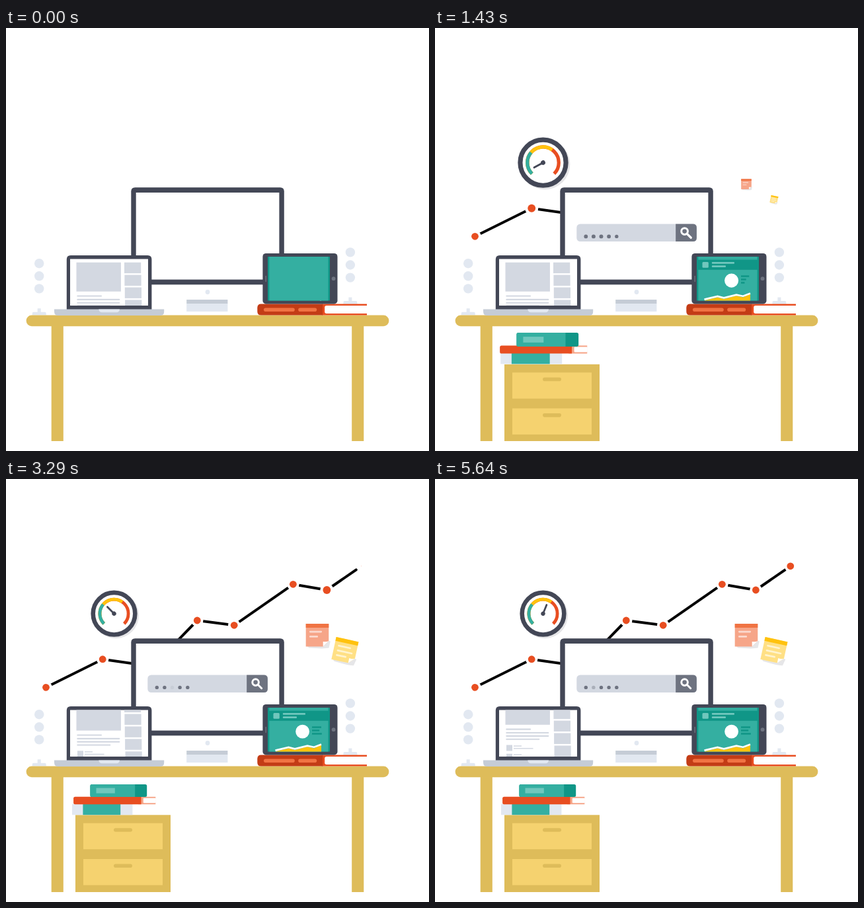
Animation, 640 px wide and 640 px high, one loop 5710 ms. Source, as an HTML page without scripts:

```html
<!DOCTYPE html>
<html lang="en">
<head>
<meta charset="utf-8">
<title>Desk</title>
<style>
@property --t { syntax: "<number>"; inherits: true; initial-value: 0; }

html, body { margin: 0; width: 100%; height: 100%; overflow: hidden; background: #fff; }

/* --t is the clock in ms; parts start at --at and take --d */
svg { display: block; width: 100%; height: 100%; animation: clock 5.71s linear infinite; }
@keyframes clock { from { --t: 0; } to { --t: 5710; } }

.pop, .tall, .grow, .slide {
  --d: 800;
  --k: 1.7;
  --p: clamp(0, (var(--t) - var(--at)) / var(--d), 1);
  --q: calc(1 - var(--p));
  --s: calc(1 + var(--q) * var(--q) * (var(--k) - (var(--k) + 1) * var(--q)));
}
.pop, .tall, .grow { transform-box: fill-box; transform-origin: center; }
.pop { scale: var(--s); }
.pop.local { transform-box: view-box; transform-origin: 0 0; }
.tall { scale: 1 var(--s); }
.grow { --d: 500; transform-origin: left; scale: calc(1 - var(--q) * var(--q) * var(--q)) 1; }
.slide { translate: 0 calc(var(--q) * var(--q) * var(--q) * var(--y)); }
.bar { opacity: clamp(0, (var(--t) - 450) / 400, 1); }

.blink {
  --x: (var(--t) - var(--b));
  --z: (var(--t) - var(--b) - 3010);
  opacity: clamp(.1, min(max(var(--x), -1 * var(--x)), max(var(--z), -1 * var(--z))) / 170, 1);
}

.page {
  --a: clamp(0, (var(--t) - 2720) / 1370, 1);
  --b: clamp(0, (var(--t) - 5250) / 850, 1);
  translate: 0 calc(-48px * (var(--a) * var(--a) * (3 - 2 * var(--a)) - var(--b) * var(--b) * (3 - 2 * var(--b))));
}

.trend { stroke-dasharray: 560 600; animation: trend 5.71s infinite; }
@keyframes trend {
  0% { stroke-dashoffset: 563; animation-timing-function: cubic-bezier(.31, 0, .67, 1); }
  62.7%, 100% { stroke-dashoffset: 10; }
}

.cabinet { animation: rise 5.71s infinite; }
@keyframes rise {
  0%, 4.2% { translate: 0 117px; animation-timing-function: cubic-bezier(.08, .7, .4, 1); }
  28%, 100% { translate: 0 0; }
}

.needle { animation: needle 5.71s ease-in-out infinite; }
@keyframes needle {
  0%, 18.7% { rotate: -135deg; }
  33.8% { rotate: -90deg; }
  57.6% { rotate: -45deg; }
  77.6% { rotate: 22deg; }
  84% { rotate: 20deg; }
  91% { rotate: 23.5deg; }
  98.8%, 100% { rotate: 22deg; }
}

.dark { fill: #434756; }
.slate { fill: #6e7380; }
.steel { fill: #c5ccd6; }
.grey { fill: #d3d8e1; }
.pale { fill: #e2e8f1; }
.wood { fill: #debc5a; }
.light { fill: #f5d26f; }
.teal { fill: #34afa1; }
.deep { fill: #109687; }
.mint { fill: #70c7bd; }
.red { fill: #e84e21; }
.rust { fill: #c33c16; }
.coral { fill: #f07343; }
.salmon { fill: #f6a588; }
.yellow { fill: #ffc20e; }
.cream { fill: #ffe085; }
.shade { fill: #e6e6e8; }
.white { fill: #fff; }
.stroke { fill: none; stroke-linecap: round; stroke-linejoin: round; }
</style>
</head>
<body>
<svg viewBox="0 0 640 640">
  <defs>
    <clipPath id="laptop-screen"><rect x="97" y="349.5" width="118" height="70.5"/></clipPath>
    <clipPath id="tablet-screen"><rect x="396" y="346" width="94" height="66.5"/></clipPath>
    <g id="marker"><circle class="white" r="9.2"/><circle class="red" r="5.4"/></g>
    <g id="speaker" class="pale">
      <circle r="7.2"/><circle cy="19.1" r="7.2"/><circle cy="38.2" r="7.2"/>
      <path d="M-2.5 68h5v5.5h6q2 0 2 2v2.5h-21v-2.5q0-2 2-2h6z"/>
    </g>
    <g id="drawer">
      <rect class="light" x="117" width="120" height="39.5"/>
      <rect class="wood" x="163" y="7.5" width="28" height="5.6" rx="2.8"/>
    </g>
    <path id="sheet" d="M-17.3-17.3h34.6v26l-8.6 8.6h-26z"/>
    <path id="fold" class="white" d="M8.7 17.3v-7.6q5 1 8.6-1z"/>
    <path id="cast" class="shade" d="M-15 17l2.5 2.3q23 1.6 30 0l2.3-10-8-2z"/>
    <g id="item">
      <rect x="108" width="9" height="9"/>
      <rect x="119" y=".8" width="12" height="1.5"/>
    </g>
  </defs>

  <rect class="white" width="640" height="640"/>

  <!-- trend line -->
  <path class="stroke trend" stroke="#000" stroke-width="4"
    d="M60.5 315.3L146.2 272.7 222 283.5 289.3 214 345.2 221.3 434.4 159.3 485.4 168 537.8 131.8"/>
  <g transform="translate(60.5 315.3)"><use href="#marker" class="pop local" style="--at:225"/></g>
  <g transform="translate(146.2 272.7)"><use href="#marker" class="pop local" style="--at:975"/></g>
  <g transform="translate(289.3 214)"><use href="#marker" class="pop local" style="--at:1722"/></g>
  <g transform="translate(345.2 221.3)"><use href="#marker" class="pop local" style="--at:2010"/></g>
  <g transform="translate(434.4 159.3)"><use href="#marker" class="pop local" style="--at:2500"/></g>
  <g transform="translate(485.4 168)"><use href="#marker" class="pop local" style="--at:2800"/></g>
  <g transform="translate(537.8 131.8)"><use href="#marker" class="pop local" style="--at:3280"/></g>

  <!-- gauge -->
  <g transform="translate(163.5 203.7)">
    <g class="pop local" style="--at:690;--d:1100">
      <circle class="shade" cx="2.5" cy="2.5" r="35"/>
      <circle class="white" r="31.8" stroke="#434756" stroke-width="6.6"/>
    </g>
    <g class="pop local" style="--at:800;--d:1100">
      <g fill="none" stroke-width="4.8" transform="rotate(135)">
        <circle r="21.6" pathLength="360" stroke="#e84e21" stroke-dasharray="270 90"/>
        <circle r="21.6" pathLength="360" stroke="#ffc20e" stroke-dasharray="170 190"/>
        <circle r="21.6" pathLength="360" stroke="#34afa1" stroke-dasharray="85 275"/>
      </g>
    </g>
    <g class="pop local" style="--at:930;--d:1100">
      <g class="needle">
        <path class="stroke" stroke="#434756" stroke-width="2.8" d="M0 0V-14.3"/>
        <circle class="dark" r="3.2"/>
      </g>
    </g>
  </g>

  <!-- sticky notes -->
  <g transform="translate(471 236.3)">
    <g class="pop local" style="--at:1310;--d:950;--k:1.2">
      <use href="#cast"/>
      <use href="#sheet" class="salmon"/>
      <rect class="coral" x="-17.3" y="-17.3" width="34.6" height="6"/>
      <path class="stroke" stroke="#fbdacf" stroke-width="2.7" d="M-10.7-5.2h16.5M-10.7 2.1h10.5"/>
      <use href="#fold"/>
    </g>
  </g>
  <g transform="translate(512.9 259.6) rotate(12.3)">
    <g class="pop local" style="--at:1350;--d:950;--k:1.2">
      <use href="#cast"/>
      <use href="#sheet" class="cream"/>
      <rect class="yellow" x="-17.3" y="-17.3" width="34.6" height="6"/>
      <path class="stroke" stroke="#fff4d0" stroke-width="2.7" d="M-10.7-5.2h17.5M-10.7 2.1h21.5M-10.7 9.2h13.5"/>
      <use href="#fold"/>
    </g>
  </g>

  <!-- monitor -->
  <path class="dark" d="M189.3 388.3V247.2q0-6 6-6h119.3 100.2q6 0 6 6V388.3z"/>
  <rect class="white" x="196.7" y="249" width="216.7" height="131.6"/>
  <circle class="pale" cx="305" cy="399.5" r="3.4"/>
  <rect class="steel" x="273.2" y="411" width="62.2" height="6.2"/>
  <rect class="pale" x="273.2" y="417" width="62.2" height="12"/>

  <!-- search field -->
  <g class="slide bar" style="--at:448;--d:970;--y:26px">
    <rect class="grey" x="214.3" y="296.4" width="181.6" height="26.6" rx="5.5"/>
    <path class="slate" d="M364.2 296.4h26.2q5.5 0 5.5 5.5v15.6q0 5.5-5.5 5.5h-26.2z"/>
    <g class="stroke" stroke="#fff" stroke-width="3">
      <circle class="pop" style="--at:690" cx="377.6" cy="307.6" r="4.8"/>
      <path class="pop" style="--at:960;transform-origin:0 0" d="M381.3 311.3l5.4 5.4"/>
    </g>
    <g class="slate">
      <g class="blink" style="--b:2100"><circle class="pop" style="--at:850" cx="228.3" cy="315.4" r="2.7"/></g>
      <g class="blink" style="--b:2700"><circle class="pop" style="--at:915" cx="239.9" cy="315.4" r="2.7"/></g>
      <g class="blink" style="--b:3300"><circle class="pop" style="--at:990" cx="251.5" cy="315.4" r="2.7"/></g>
      <g class="blink" style="--b:3900"><circle class="pop" style="--at:1065" cx="263.1" cy="315.4" r="2.7"/></g>
      <g class="blink" style="--b:4510"><circle class="pop" style="--at:1140" cx="274.8" cy="315.4" r="2.7"/></g>
    </g>
  </g>

  <use href="#speaker" x="50.2" y="356.2"/>
  <use href="#speaker" x="520.9" y="339.4"/>

  <!-- cabinet and its books -->
  <g class="cabinet">
    <rect class="wood" x="105" y="508.3" width="144" height="130"/>
    <use href="#drawer" y="520.7"/>
    <use href="#drawer" y="575"/>
  </g>
  <g class="pop" style="--at:720">
    <rect class="pale" x="100" y="491.8" width="91.4" height="16.4"/>
    <rect class="teal" x="116.4" y="491.8" width="56.8" height="16.4"/>
  </g>
  <g class="pop" style="--at:830">
    <rect class="salmon" x="200" y="480.8" width="26.3" height="11.4"/>
    <rect class="white" x="207.8" y="482.8" width="19" height="7.4" rx="1"/>
    <path class="red" d="M204.5 480.8H104.6q-2.5 0-2.5 2.5v6.4q0 2.5 2.5 2.5h99.9z"/>
  </g>
  <g class="pop" style="--at:910">
    <rect class="deep" x="127.4" y="462" width="85.8" height="19" rx="2.5"/>
    <path class="teal" d="M195.2 462h-65.3q-2.5 0-2.5 2.5v14q0 2.5 2.5 2.5h65.3z"/>
    <rect class="mint" x="136.5" y="467.5" width="28.3" height="8"/>
  </g>

  <!-- table -->
  <g class="wood">
    <rect x="68.7" y="450" width="18.1" height="180"/>
    <rect x="523.2" y="450" width="18.1" height="180"/>
    <rect x="30.6" y="434.6" width="548.8" height="16.6" rx="8.3"/>
  </g>

  <!-- laptop -->
  <path class="dark" d="M91.8 426V350q0-6 6-6H214.4q6 0 6 6v76z"/>
  <rect class="white" x="97" y="349.5" width="118" height="70.5"/>
  <g clip-path="url(#laptop-screen)">
    <g class="page grey">
      <rect x="106.5" y="354.7" width="67.4" height="44"/>
      <rect x="179" y="354.7" width="25.2" height="16.4"/>
      <rect x="179.4" y="373.6" width="25.2" height="16.4"/>
      <rect x="179.8" y="392.5" width="25.2" height="16.4"/>
      <rect x="180.1" y="411.4" width="25.2" height="16.4"/>
      <rect x="180.5" y="430.3" width="25.2" height="16.4"/>
      <path class="stroke" stroke="#d3d8e1" stroke-width="2.1" d="M108.3 405.5h35.7M108.3 410.9h63M108.3 415.7h63M108.3 420.6h49"/>
      <use href="#item" y="429.3"/>
      <rect x="119" y="433.8" width="29.5" height="1.5"/>
      <use href="#item" y="442.6"/>
      <rect x="119" y="447.2" width="27" height="1.5"/>
      <use href="#item" y="456.3"/>
      <rect x="119" y="460.8" width="46.5" height="1.5"/>
    </g>
  </g>
  <path class="steel" d="M73 425.5h166.2v3.5q0 6-6 6H79q-6 0-6-6z"/>
  <path class="pale" d="M140.3 425.5h31.7q-.5 4.8-5 4.8h-21.7q-4.500 0-5-4.800z"/>

  <!-- book below the tablet -->
  <path class="red" d="M478 417.6h68v17h-68z"/>
  <path class="white" d="M546 420h-61q-2.800 0-2.800 2.800v6.400q0 2.800 2.800 2.800h61z"/>
  <path class="rust" d="M479.200 417.600H386q-5.700 0-5.700 5.700v5.600q0 5.700 5.700 5.700h93.200z"/>
  <rect class="coral" x="390" y="423.400" width="46.800" height="5.600" rx="2.800"/>
  <rect class="coral" x="442.200" y="423.400" width="28" height="5.600" rx="2.800"/>

  <!-- tablet -->
  <rect class="dark" x="388.400" y="340.900" width="113.100" height="76.500" rx="5"/>
  <path class="stroke" stroke="#70747f" stroke-width="1.400" d="M393.200 375.500v8"/>
  <circle class="slate" cx="495.600" cy="379.200" r="2.900"/>
  <g clip-path="url(#tablet-screen)">
    <rect class="deep" x="396" y="346" width="94" height="67"/>
    <rect class="teal" x="398.300" y="346" width="89.200" height="67"/>
    <rect class="deep tall" style="--at:390" x="396" y="350.600" width="94" height="15.200"/>
    <g class="mint">
      <rect class="pop" style="--at:485" x="404.500" y="354" width="9.300" height="8.700" rx="1.500"/>
      <rect class="grow" style="--at:720" x="418.800" y="354" width="34.200" height="2.800" rx="1"/>
      <rect class="grow" style="--at:970" x="418.800" y="359.200" width="21.200" height="2.800" rx="1"/>
    </g>
    <circle class="white pop" style="--at:710" cx="448.600" cy="382.100" r="10.400"/>
    <g class="deep">
      <rect class="grow" style="--at:1180" x="463" y="374.300" width="14" height="2.500"/>
      <rect class="grow" style="--at:1270" x="463" y="379.200" width="11.200" height="2.500"/>
      <rect class="grow" style="--at:1360" x="463" y="384.200" width="14.800" height="2.500"/>
    </g>
    <g class="slide" style="--at:412;--d:700;--y:12px">
      <path class="yellow" d="M408 412L428 407.500 437 410 456 405 466 407.500 477 402V426H408z"/>
      <path fill="none" stroke="#fff" stroke-width="2.700" d="M407.500 410.600L427.500 406 437 408.300 456 403.700 466 405.700 477 401.500"/>
    </g>
  </g>

  <rect class="white" y="625" width="640" height="15"/>
</svg>
</body>
</html>
```
